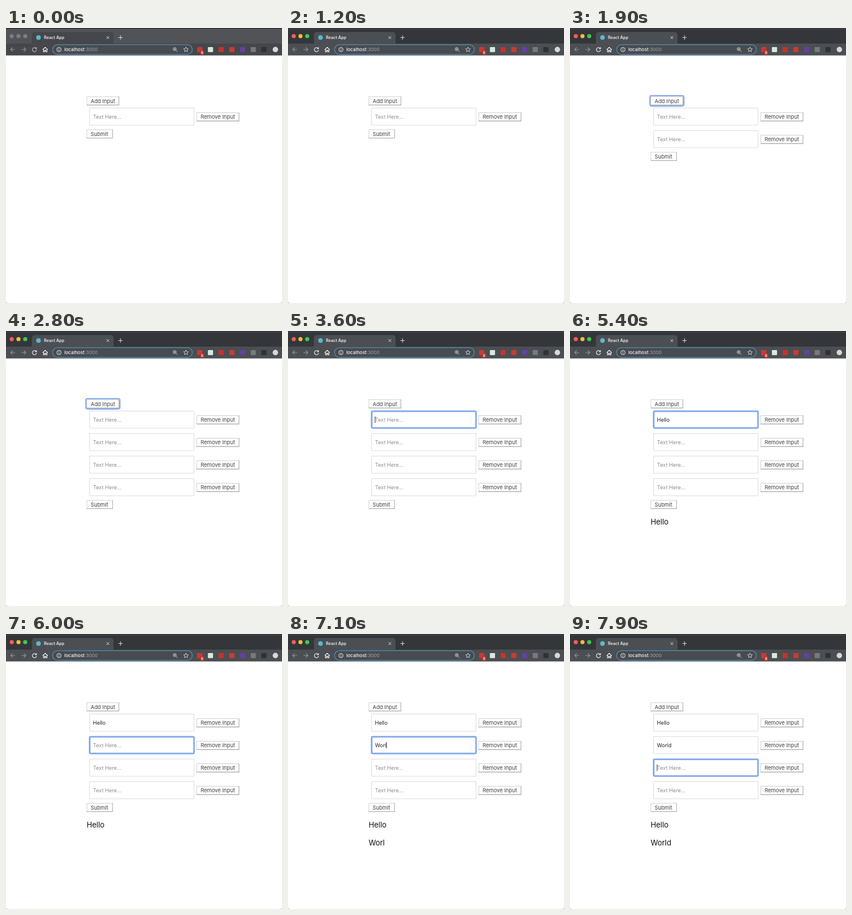
An HTML page with a canvas for the animation above (8 s loop, 480x476 px).

```html
<!DOCTYPE html>
<html lang="en">
<head>
<meta charset="utf-8">
<title>React App</title>
<style>
  html, body { margin: 0; width: 100%; height: 100%; overflow: hidden; background: #fff; }
  canvas { display: block; width: 480px; height: 476px; }
</style>
</head>
<body>
<canvas id="stage" width="480" height="476"></canvas>
<script>
const ctx = document.getElementById('stage').getContext('2d');
const LOOP = 8000, ROW = 39;

const rowTimes = [0, 1600, 2400, 2700];
// Focus target: -1 is the Add button, 0 and up are the inputs.
const focusSteps = [[0, null], [1500, -1], [3200, 0], [5500, 1], [7600, 2]];
const typing = [
  { word: 'Hello', at: [4300, 4400, 4600, 4700, 4900] },
  { word: 'World', at: [6400, 6600, 6800, 7000, 7200] }
];

function rect(x, y, w, h, color, r = 0) {
  ctx.fillStyle = color;
  ctx.beginPath();
  ctx.roundRect(x, y, w, h, r);
  ctx.fill();
}

function frame(x, y, w, h, color, width = 1, r = 0) {
  ctx.strokeStyle = color;
  ctx.lineWidth = width;
  ctx.beginPath();
  ctx.roundRect(x, y, w, h, r);
  ctx.stroke();
}

function dot(x, y, r, color) {
  ctx.fillStyle = color;
  ctx.beginPath();
  ctx.arc(x, y, r, 0, 7);
  ctx.fill();
}

function line(d, color, width = 1.1) {
  ctx.strokeStyle = color;
  ctx.lineWidth = width;
  ctx.stroke(new Path2D(d));
}

function text(s, x, y, size, color, weight = 400) {
  ctx.font = `${weight} ${size}px Inter, "Liberation Sans", sans-serif`;
  ctx.fillStyle = color;
  ctx.fillText(s, x, y);
  return ctx.measureText(s).width;
}

function drawTabs(active) {
  const tab = active ? '#4b4e52' : '#45474a';
  rect(0, 0, 480, 28, active ? '#34363a' : '#515356');
  rect(0, 0, 480, 1, '#242529');
  rect(0, 1, 480, 1, '#4b4d50');
  rect(45, 7, 142, 22, tab, [5, 5, 0, 0]);
  rect(0, 27, 480, 20.5, tab);
  const lights = active ? ['#f2605a', '#f6bd3b', '#3fc950'] : Array(3).fill('#7b7d80');
  lights.forEach((c, i) => dot(10 + 11.7 * i, 14, 3.6, c));
  dot(56.5, 16.5, 4, '#58b9d3');
  text('React App', 66, 19, 7.1, '#eceded', 600);
  line('M174.7 14.2l4.8 4.8m0-4.8l-4.8 4.8', '#d3d4d5', 1);
  line('M195.5 16.5h7.4m-3.7-3.7v7.4', '#d3d4d5');
}

function drawToolbar(active) {
  const dim = '#94969a', pale = '#e7e8e9';
  line('M15.7 37.3h-7.5m3.5-3.6l-3.6 3.6l3.6 3.6', dim);
  line('M27 37.3h7.5m-3.5-3.6l3.6 3.6l-3.6 3.6', dim);
  line('M52.4 35.2a3.6 3.6 0 1 0 .7 3M53 33.2v2.8h-2.8', active ? pale : '#b1b3b5', 1.2);
  line('M63.8 37.4l4.4-4l4.4 4M65.2 36.8v4.5h2v-2.8h2v2.8h2v-4.5', '#fff', 1.1);

  rect(81, 28.8, 243, 16.8, '#484b50', 8.4);
  frame(81, 28.8, 243, 16.8, '#4f8fb3', 1.2, 8.4);
  frame(88.4, 33.6, 7.4, 7.4, pale, 1, 3.7);
  line('M92.1 36.8v2.5M92.1 35v1', pale, 1);
  const w = text('localhost', 101.4, 40.1, 8.1, '#f4f4f4', 500);
  text(':3000', 101.4 + w, 40.1, 8.1, '#a5a7aa');
  frame(290.7, 33.8, 5.4, 5.4, '#d0d2d4', 1, 2.7);
  line('M295.6 38.6l2.7 2.7M292 36.5h2.8m-1.4-1.4v2.8', '#d0d2d4', .9);
  line('M313 33l1.2 2.8l3 .2l-2.3 2l.7 3l-2.6-1.6l-2.6 1.6l.7-3l-2.3-2l3-.2z', '#d0d2d4', .9);

  const icons = ['#c83a35', '#d9e8dc', '#cb302b', '#c93b33', '#6441a0', '#77797c', '#303236'];
  icons.forEach((c, i) => rect(332.5 + 18.6 * i, 33, 9, 8.8, c, 1));
  rect(337.5, 39, 6.8, 7.5, '#c62d2b', 1.5);
  text('6', 339.2, 45.2, 6, '#fff', 600);
  dot(468.5, 37.2, 4.7, '#d7d8d7');
}

function button(label, x, y, w, focused) {
  const h = 15.4;
  if (focused) frame(x - .8, y - .8, w + 1.6, h + 1.6, '#8aaff0', 3.2, 2.5);
  rect(x, y, w, h, '#fff');
  frame(x + .5, y + .5, w - 1, h - 1, '#d0d0d0');
  rect(x, y + h - 1, w, 1, '#a5a5a5');
  rect(x + w - 1, y, 1, h, '#b3b3b3');
  text(label, x + 7.1, y + 11.3, 9.25, '#404040');
}

function input(i, value, focused, caretOn) {
  const y = 138 + ROW * i;
  rect(145, y, 182.5, 30.5, '#fff');
  if (focused) frame(145.5, y + .8, 181.5, 29, '#80a8ec', 2.8, 2);
  else frame(145.5, y + .5, 181.5, 29.7, '#dcdcdc');
  const w = text(value || 'Text Here...', 151.2, y + 19.2, 9.15, value ? '#222' : '#8e8e8e');
  if (focused && caretOn) rect(151 + (value ? w : 0), y + 10, 1, 11, '#333');
  button('Remove Input', 331.3, y + 8, 74.4, false);
}

function draw(now) {
  const t = now % LOOP;
  const active = t >= 1100;
  const rows = rowTimes.filter(s => t >= s).length;
  const [since, focus] = focusSteps.filter(([s]) => t >= s).pop();
  const values = typing.map(({ word, at }) => word.slice(0, at.filter(s => t >= s).length));

  // Each key press restarts the caret's blink.
  const keys = typing.flatMap(k => k.at).filter(s => t >= s);
  const blinkStart = Math.max(focus === 0 ? 3600 : since, ...keys);
  const caretOn = t < blinkStart || (t - blinkStart) % 1000 < 500;

  rect(0, 0, 480, 476, '#fff');
  drawTabs(active);
  drawToolbar(active);
  button('Add Input', 140.2, 118.4, 56.6, focus === -1);
  for (let i = 0; i < rows; i++) input(i, values[i], focus === i, caretOn);
  button('Submit', 140.2, 175.6 + ROW * (rows - 1), 45.6, false);
  values.forEach((v, i) => text(v, 140.2, 335.3 + 30.4 * i, 12.9, '#111'));
  line('M0 474.5l1.5 1.5M480 474.5l-1.5 1.5', '#777', 1);
}

function tick(now) {
  draw(now);
  requestAnimationFrame(tick);
}
requestAnimationFrame(tick);
</script>
</body>
</html>
```
